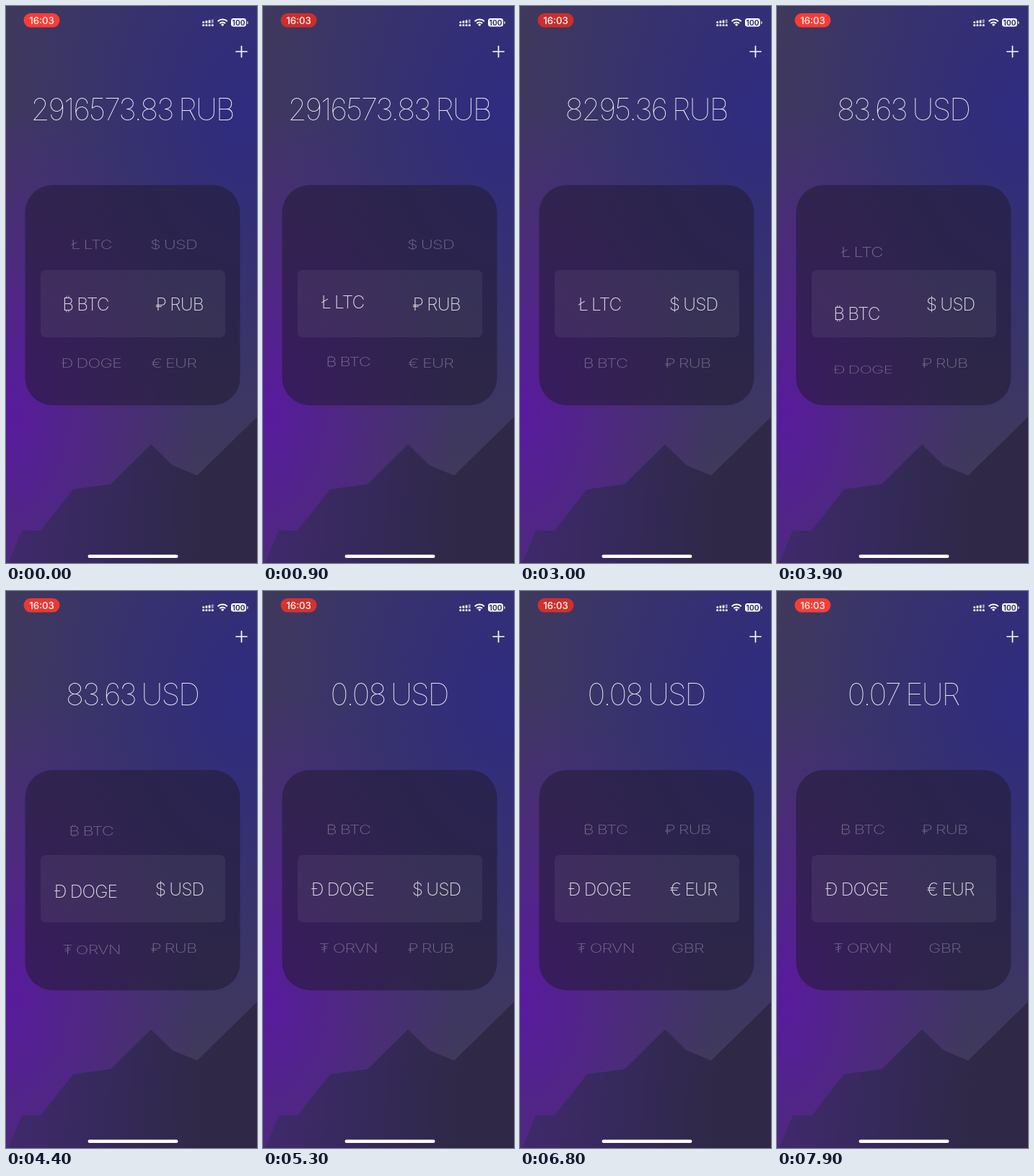
An HTML page that plays this animation: 348x770 px, repeating every 8 s.

```html
<!DOCTYPE html>
<html lang="en">
<head>
<meta charset="utf-8">
<title>Currency converter</title>
<style>
  html, body { margin: 0; width: 100%; height: 100%; overflow: hidden; background: #403a5c; }
  svg { display: block; width: 348px; height: 770px; }
  text { font-family: Inter, Roboto, "Noto Sans", "DejaVu Sans", sans-serif; text-anchor: middle; fill: #fff; }
  #amount { font-size: 42px; font-weight: 100; letter-spacing: -2.1px; word-spacing: -2px; }
  .wheel text { font-size: 24.5px; font-weight: 200; letter-spacing: -.8px; word-spacing: -1px; }
</style>
</head>
<body>
<svg viewBox="0 0 348 770" xmlns="http://www.w3.org/2000/svg">
  <defs>
    <radialGradient id="blue" gradientUnits="userSpaceOnUse" cx="0" cy="0" r="1"
      gradientTransform="translate(335 150) scale(370 520)">
      <stop stop-color="#2f2b80"/>
      <stop offset="1" stop-color="#2f2b80" stop-opacity="0"/>
    </radialGradient>
    <radialGradient id="purple" gradientUnits="userSpaceOnUse" cx="0" cy="0" r="1"
      gradientTransform="translate(0 565) scale(270 430)">
      <stop stop-color="#591a9f"/>
      <stop offset="1" stop-color="#591a9f" stop-opacity="0"/>
    </radialGradient>
    <linearGradient id="rock" gradientUnits="userSpaceOnUse" x1="0" y1="700" x2="270" y2="720">
      <stop stop-color="#40296c"/>
      <stop offset=".55" stop-color="#35295a"/>
      <stop offset="1" stop-color="#2f2947"/>
    </linearGradient>
    <clipPath id="inLens"><rect x="48" y="365" width="256" height="93"/></clipPath>
    <clipPath id="offLens"><path d="M27 248H324V365H27ZM27 458H324V552H27Z"/></clipPath>
  </defs>

  <rect width="348" height="770" fill="#403a5a"/>
  <rect width="348" height="770" fill="url(#blue)"/>
  <rect width="348" height="770" fill="url(#purple)"/>
  <path d="M3 770 22 725H48L93 668 145 661 201 606 231 635 265 649 348 568V770Z" fill="url(#rock)"/>

  <rect id="pill" x="24.500" y="10" width="50" height="19.500" rx="9.750"/>
  <text x="49.500" y="24.600" font-size="13.200" font-weight="500">16:03</text>
  <g id="signal" fill="#fff"></g>
  <g fill="none" stroke="#fff" stroke-width="2">
    <path d="M293.600 21.200a9.300 9.300 0 0 1 13.200 0M296.300 24a5.500 5.500 0 0 1 7.800 0"/>
    <path d="M298 25.800a3 3 0 0 1 4.400 0L300.200 28Z" fill="#fff" stroke="none"/>
  </g>
  <rect x="312" y="17" width="21" height="11.500" rx="3.500" fill="#fff"/>
  <path d="M334 21a2 2 0 0 1 0 4Z" fill="#fff" opacity=".7"/>
  <text x="322.500" y="26.500" font-size="10" font-weight="700" style="fill:#332d72">100</text>
  <path d="M319 63H334M326.500 55.500V70.500" stroke="#fff" stroke-width="1.700" stroke-linecap="round"/>

  <text id="amount" x="175" y="157.500" fill-opacity=".94"></text>

  <rect x="26.500" y="247.500" width="298" height="304.500" rx="38" fill="#221a32" fill-opacity=".55"/>
  <rect x="48" y="365" width="256" height="93" rx="7" fill="#fff" fill-opacity=".06"/>
  <g class="wheel" id="outer" clip-path="url(#offLens)"></g>
  <g class="wheel" id="lens" clip-path="url(#inLens)"></g>

  <rect x="113.500" y="758.500" width="125" height="4.500" rx="2.250" fill="#fff"/>
</svg>
<script>
  const LOOP = 8000, RADIUS = 114, STEP = 46 * Math.PI / 180, MID_X = 175, MID_Y = 411.5;
  const $ = id => document.getElementById(id);

  function add(parent, tag, attrs, label) {
    const el = document.createElementNS('http://www.w3.org/2000/svg', tag);
    for (const key in attrs) el.setAttribute(key, attrs[key]);
    if (label) el.textContent = label;
    return parent.appendChild(el);
  }

  // Each move: [start ms, end ms, from index, to index]
  const wheels = [
    { x: 110.5, items: ['Ł LTC', '₿ BTC', 'Ð DOGE', '₮ ORVN'],
      moves: [[150, 1100, 1, 0], [3550, 4573, 0, 2]] },
    { x: 240.5, items: ['$ USD', '₽ RUB', '€ EUR', 'GBR'],
      moves: [[1950, 2900, 1, 0], [5600, 6647, 0, 2]] }
  ];
  const amounts = [
    [0, '2916573.83 RUB'], [1500, '8295.36 RUB'], [3300, '83.63 USD'],
    [4900, '0.08 USD'], [6900, '0.07 EUR']
  ];

  for (const wheel of wheels) {
    wheel.rows = wheel.items.map(label => ({
      lens: add($('lens'), 'text', { y: 9, 'fill-opacity': .82 }, label),
      outer: add($('outer'), 'text', { y: 9 }, label)
    }));
  }

  for (let i = 0; i < 4; i++) {
    const x = 272.3 + i * 4.2, h = 2.6 + i * .9;
    add($('signal'), 'rect', { x, y: 25.3, width: 2.8, height: 2.8, rx: .7 });
    add($('signal'), 'rect', { x, y: 23.8 - h, width: 2.8, height: h, rx: .7, opacity: i < 3 ? 1 : .5 });
  }

  const ease = u => 1 - (1 - u) ** 3 * (1 + 3 * u);

  function position(moves, t) {
    let pos = moves[0][2];
    for (const [start, end, from, to] of moves) {
      if (t >= start) pos = from + (to - from) * ease(Math.min(1, (t - start) / (end - start)));
    }
    return pos;
  }

  function place(el, x, y, sx, sy) {
    el.setAttribute('transform', `translate(${x} ${y}) scale(${sx} ${sy})`);
  }

  function drawWheel({ x, moves, rows }, t) {
    const pos = position(moves, t);
    rows.forEach(({ lens, outer }, i) => {
      const angle = (i - pos) * STEP, depth = Math.cos(angle);
      const visible = depth > .02;
      lens.style.display = outer.style.display = visible ? '' : 'none';
      if (!visible) return;
      const y = MID_Y + RADIUS * Math.sin(angle);
      const zoom = .918 - .13 * (1 - depth);
      place(lens, x, y, 1, depth);
      place(outer, MID_X + (x - MID_X) * zoom, y, zoom * 1.09, depth);
      outer.setAttribute('fill-opacity', .2 + .2 * depth);
    });
  }

  function draw(t) {
    const dim = (1 - Math.cos(t / 1000 * Math.PI)) / 2;
    const mix = (a, b) => Math.round(a + (b - a) * dim);
    $('pill').setAttribute('fill', `rgb(${mix(251, 205)},${mix(60, 46)},${mix(53, 43)})`);
    const label = amounts.filter(([start]) => t >= start).pop()[1];
    if ($('amount').textContent !== label) $('amount').textContent = label;
    wheels.forEach(wheel => drawWheel(wheel, t));
  }

  const begin = performance.now();
  function tick() {
    draw((performance.now() - begin) % LOOP);
    requestAnimationFrame(tick);
  }
  tick();
</script>
</body>
</html>
```
